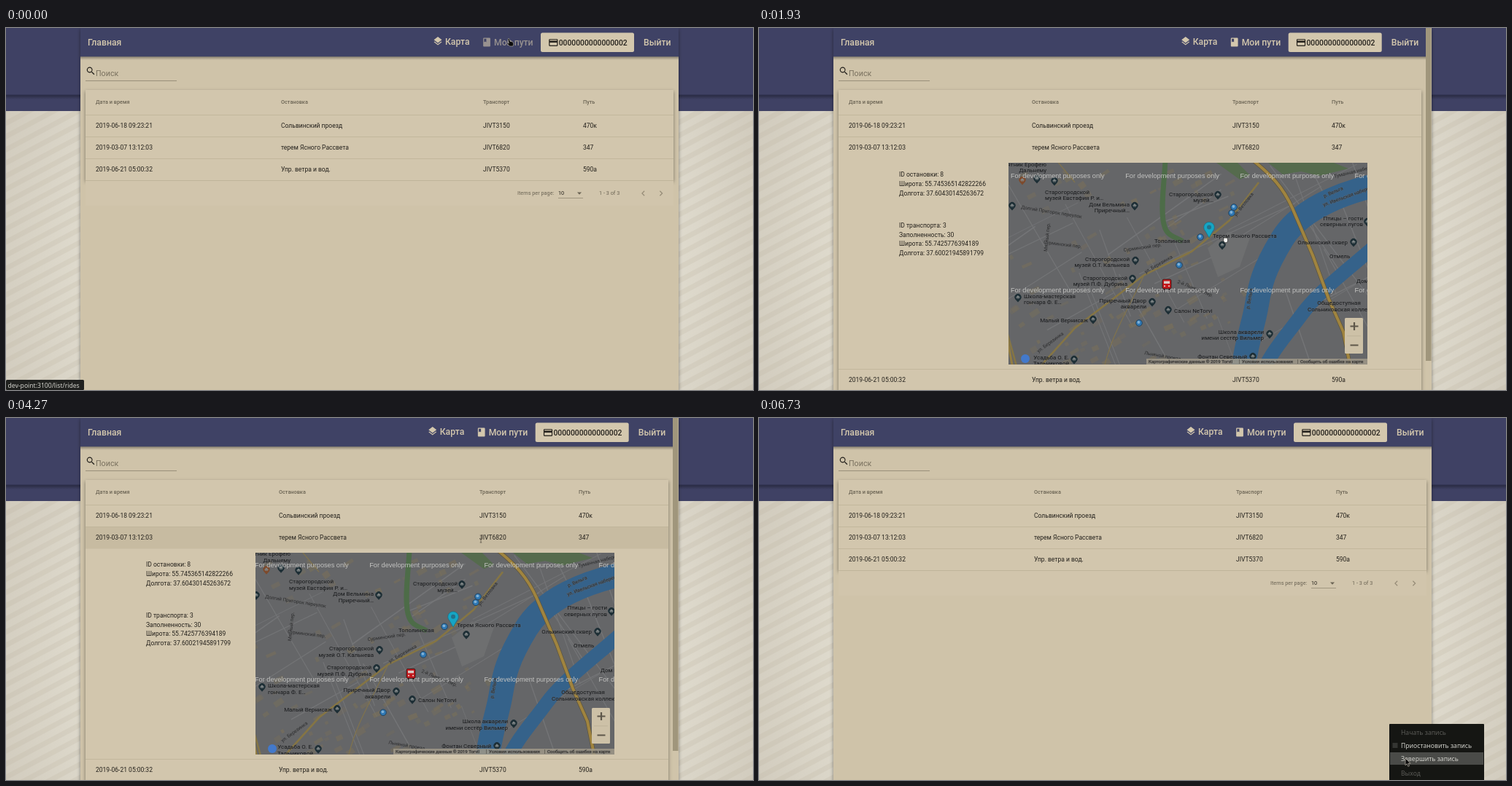
Recreate the animation shown at these times as an HTML page. Size 1024 px wide and 497 px high, loop 7270 ms.

```html
<!DOCTYPE html>
<html lang="ru">
<head>
<meta charset="utf-8">
<title>Поездки</title>
<style>
html, body { margin: 0; width: 100%; height: 100%; overflow: hidden; background: #d0c4aa; }
svg { display: block; width: 100%; height: 100%; }
text { font-family: Roboto, sans-serif; font-size: 8.53px; fill: #24211c; white-space: pre; }
.nav text { font-size: 12.2px; font-weight: 500; fill: #d3c7ad; }
.nav path { fill: #d3c7ad; }
.nav .card { font-size: 10.35px; fill: #24211c; }
.nav path.dark { fill: #24211c; }
.head text { font-size: 7.3px; font-weight: 500; fill: #6b6454; }
.small text { font-size: 7.3px; fill: #6b6454; }
.map text { font-size: 7.95px; fill: #17191b; stroke: #67686a; stroke-width: 1.2px; stroke-opacity: .5; paint-order: stroke; }
.map .street { font-size: 6.6px; fill: #2a2b2c; }
.map .stamp { font-family: "Liberation Sans", Arial, sans-serif; font-size: 9.2px; fill: #c2c2c0; stroke: none; }
.legal text { font-size: 6.1px; fill: #26241f; }
.os text { font-family: "Noto Sans", sans-serif; font-size: 8.6px; fill: #d2d2cc; }
.os .off { fill: #5b5b57; }
</style>
</head>
<body>
<svg id="stage" viewBox="0 0 1024 497" preserveAspectRatio="none"></svg>
<script>
const LOOP = 7270, STEP = 200 / 3, FULL = 289;
const stage = document.getElementById('stage');

const rect = (x, y, w, h, fill, extra = '') =>
  `<rect x="${x}" y="${y}" width="${w}" height="${h}" fill="${fill}" ${extra}/>`;
const text = (x, y, s, extra = '') => `<text x="${x}" y="${y}" ${extra}>${s}</text>`;
const line = (d, color, width, extra = '') =>
  `<path d="${d}" fill="none" stroke="${color}" stroke-width="${width}" ${extra}/>`;

const ICONS = {
  layers: 'M12 18.54l-7.37-5.73L3 14.07l9 7 9-7-1.63-1.27zM12 16l7.36-5.73L21 9l-9-7-9 7 1.63 1.27z',
  book: 'M18 2H6c-1.1 0-2 .9-2 2v16c0 1.1.9 2 2 2h12c1.1 0 2-.9 2-2V4c0-1.1-.9-2-2-2zM6 4h5v8l-2.5-1.5L6 12z',
  card: 'M20 4H4c-1.1 0-2 .9-2 2v12c0 1.1.9 2 2 2h16c1.1 0 2-.9 2-2V6c0-1.1-.9-2-2-2zm0 14H4v-6h16zm0-10H4V6h16z',
  search: 'M15.5 14h-.8l-.3-.3A6.5 6.5 0 1 0 13.7 14.4l.3.3v.8l5 5 1.5-1.5zm-6 0a4.5 4.5 0 1 1 0-9 4.5 4.5 0 0 1 0 9z',
  prev: 'M15.4 7.4L14 6l-6 6 6 6 1.4-1.4L10.8 12z',
  next: 'M10 6L8.6 7.4 13.2 12l-4.6 4.6L10 18l6-6z'
};
const icon = (name, cx, cy, extra = '') =>
  `<path d="${ICONS[name]}" transform="translate(${cx - 7.3} ${cy - 7.3}) scale(.61)" ${extra}/>`;

// Table
const COLUMNS = [123, 377, 654, 791];
const cells = (y, values) =>
  values.map((v, i) => text(COLUMNS[i], y, v, `class="col${i}"`)).join('');
const border = y => rect(109, y, 806, .7, '#bcb096', 'class="wide"');

// Map
let seed = 11;
const random = () => (seed = (seed * 16807) % 2147483647) / 2147483647;
const between = (a, b) => a + random() * (b - a);

function cityBlocks() {
  let out = '';
  for (let i = 0; i < 34; i++) {
    const x = between(340, 880), y = between(180, 470), steep = i % 2;
    const length = between(40, 130), angle = (steep ? 62 : -27) + between(-9, 9);
    out += line(`M${-length} 0H${length}`, '#747577', between(.7, 1.6),
      `transform="translate(${x} ${y}) rotate(${angle})"`);
  }
  for (let i = 0; i < 110; i++) {
    const x = between(350, 680), y = between(190, 462);
    out += rect(0, 0, between(4, 15), between(3, 9), '#7a7059',
      `opacity="${between(.25, .65)}" transform="translate(${x} ${y}) rotate(${between(-36, -22)})"`);
  }
  return out;
}

const PIN = 'M0 6.5L-3.6 2.4A4.6 4.6 0 1 1 3.6 2.4Z';
const pin = (x, y, fill = '#1d2e35') =>
  `<g transform="translate(${x} ${y})"><path d="${PIN}" fill="${fill}"/><path d="M-2 1h4M0-2.5l2.4 2.4h-4.8z" stroke="#83898a" stroke-width=".8" fill="#83898a"/></g>`;

const PLACES = [
  ['end', 411, 188, 'Памятник Ерофею|Дальнему', 398, 205],
  ['start', 409, 226, 'Старогородской|музей Евстафия Р. и…', 422, 208],
  ['end', 525, 243, 'Дом Вельмина|Приречный…', 532, 242],
  ['end', 640, 229, 'Старогородской|музей…', 646, 227],
  ['end', 357, 242, 'Клуб|на', 364, 242],
  ['start', 639, 286, 'Терем Ясного Рассвета', 652, 296],
  ['end', 525, 318, 'Старогородской|музей О.Т. Кальнева', 533, 317],
  ['end', 522, 344, 'Старогородской|музей П.Ф. Дубрина', 529, 342],
  ['start', 380, 369, 'Школа-мастерская|гончара Ф. Е…', 372, 368],
  ['end', 548, 375, 'Приречный Двор|акварели', 556, 374],
  ['start', 586, 389, 'Салон NeTorvi', 578, 385],
  ['end', 468, 402, 'Малый Вернисаж', 475, 398],
  ['end', 709, 418, 'Школа акварели|имени сестёр Вильмер', 717, 418],
  ['end', 686, 452, 'Фонтан Северный', 694, 449],
  ['end', 442, 453, 'Усадьба О. Е.|Тальниковой', 449, 453],
  ['end', 845, 262, 'Птицы – гости|северных лугов', 851, 264],
  ['end', 824, 295, 'Ольхинский сквер', 832, 292]
];
const places = () => PLACES.map(([anchor, x, y, name, px, py]) =>
  name.split('|').map((s, i) => text(x, y + i * 8.4, s, `text-anchor="${anchor}"`)).join('') + pin(px, py)).join('');

const STREETS = [
  [547, 335, -30, 'ул. Березинка'], [400, 444, -36, 'ул. Березинка'], [671, 257, -52, 'ул. Ветловка'],
  [792, 231, -24, 'р. Вельга'], [689, 384, -80, 'р. Вельга'], [806, 204, -14, 'Туманная набережная'],
  [791, 243, -20, 'ул. Ивельская набережная'], [407, 294, 7, 'Сурминский пер.'], [517, 305, -8, 'Сурминский пер.'],
  [376, 246, 9, 'Долгий Пригорок переулок'], [412, 305, -84, 'Мятный пер.'], [352, 392, -84, 'Речной б-р'],
  [590, 348, 22, '2-й Льняной пер.'], [545, 446, 10, 'Льняной проезд']
];
const streets = () => STREETS.map(([x, y, a, s]) =>
  text(0, 0, s, `class="street" transform="translate(${x} ${y}) rotate(${a})"`)).join('');

const dot = (x, y) =>
  `<circle cx="${x}" cy="${y}" r="4.3" fill="#2f78b4" stroke="#24435d"/><circle cx="${x - .6}" cy="${y - 1}" r="1.9" fill="#7fb1d6"/>`;

function stamps() {
  let out = '';
  for (let i = -1; i < 4; i++)
    for (let j = 0; j < 2; j++)
      out += text(362 + i * 157.2, 203.6 + j * 157, 'For development purposes only', 'class="stamp"');
  return out;
}

const map = () => `
  ${rect(342, 185, 492, 277, '#77776f')}
  <g id="tiles">
    ${rect(347, 170, 560, 310, '#656668')}
    ${cityBlocks()}
    <path d="M632 300l28-22 30 8-14 40-30 14z" fill="#6e6f70"/>
    ${line('M574 180C572 215 568 240 571 262S584 283 598 291', '#4d6c48', 7)}
    <path d="M715 183h90l20 8-40 10-25-6-25 4zM640 180l30 0 20 20-14 6z" fill="#556b4d"/>
    ${line('M880 210C820 222 760 245 734 288S704 350 699 380 684 430 679 480', '#35628a', 33)}
    ${line('M880 280C845 315 790 352 762 390S720 440 700 485', '#35628a', 19)}
    ${line('M347 360C350 400 362 430 372 470M396 470L450 410 545 337 610 305 662 262 702 210', '#857544', 2.6)}
    ${line('M347 340C352 400 358 430 366 470', '#927c42', 3)}
    ${line('M692 178C720 200 736 218 748 245L776 310 798 370 818 415 830 475', '#5d553f', 5.5)}
    ${line('M692 178C720 200 736 218 748 245L776 310 798 370 818 415 830 475', '#a0843f', 4)}
    ${line('M490 465C500 420 520 390 545 337M425 180L450 210', '#80734c', 1.2)}
    ${streets()}${places()}
    ${pin(378, 207, '#7d4a2c')}
    ${text(559, 293, 'Тополинская')}${text(799, 314, 'Отмель')}
    ${text(812, 378, 'Общедоступная', 'text-anchor="middle"')}${text(819, 386.5, 'Сольниковская коллекция', 'text-anchor="middle"')}
    ${text(836, 348, 'Дом Ветров')}
    ${stamps()}
    ${dot(538, 403)}${dot(593, 323.5)}${dot(622, 285)}${dot(665, 252)}${dot(668, 244)}
    <path d="M634 286L629 277A7.3 7.3 0 1 1 639 277Z" fill="#16a5c4" stroke="#1a6a80" stroke-width=".7"/>
    <circle cx="634" cy="271.5" r="3" fill="#23718a"/>
    ${rect(570, 343, 12, 13, '#c4181c', 'rx="2" stroke="#2b1010" stroke-width=".8"')}
    ${rect(572, 345.5, 8, 3.5, '#d8c9c4')}${rect(572, 351.5, 2, 1.6, '#e6d5cc')}${rect(578, 351.5, 2, 1.6, '#e6d5cc')}
    ${rect(571.5, 356, 2, 1.6, '#2b1010')}${rect(578.5, 356, 2, 1.6, '#2b1010')}
  </g>
  <circle cx="365" cy="454" r="6" fill="#4379cb"/>
  <g class="legal">${rect(531, 454, 303, 8, '#9f9889', 'opacity=".85"')}
    ${text(534, 460.3, 'Картографические данные © 2019 Torvil')}
    ${text(662, 460.3, 'Условия использования')}${text(742, 460.3, 'Сообщить об ошибке на карте')}
    ${line('M658.5 455v6M738.5 455v6', '#4b4840', .6)}
  </g>
  ${rect(803, 398, 25, 49, '#cdc1a7', 'rx="1.5"')}
  ${line('M806 422.8h19', '#b3a88f', .6)}
  ${line('M810.5 409.5h11M816 404v11M810.5 435.5h11', '#5e574a', 2.2)}`;

const details = ['ID остановки: 8', 'Широта: 55.745365142822266', 'Долгота: 37.60430145263672', '',
  'ID транспорта: 3', 'Заполненность: 30', 'Широта: 55.7425776394189', 'Долгота: 37.60021945891799']
  .map((s, i) => text(192, i < 4 ? 203.7 + i * 13 : 273.6 + (i - 4) * 12.9, s)).join('');

stage.innerHTML = `
<defs>
  <radialGradient id="paper" gradientUnits="userSpaceOnUse" cx="512" cy="320" r="560">
    <stop offset=".65" stop-color="#e3dfd2"/><stop offset="1" stop-color="#d0cabc"/>
  </radialGradient>
  <pattern id="stripes" width="16" height="16" patternUnits="userSpaceOnUse" patternTransform="rotate(-28)">
    ${rect(0, 0, 16, 7, '#b9b09c', 'opacity=".2"')}
  </pattern>
  <linearGradient id="fade" x2="0" y2="1"><stop stop-opacity=".35"/><stop offset="1" stop-opacity="0"/></linearGradient>
  <filter id="lift" x="-5%" y="-10%" width="110%" height="125%"><feDropShadow dx="0" dy="2" stdDeviation="2.6" flood-opacity=".42"/></filter>
  <clipPath id="rowClip"><rect id="reveal" x="109" y="179.5" width="806" height="0"/></clipPath>
  <clipPath id="mapClip">${rect(342, 185, 492, 277, '#000')}</clipPath>
</defs>
${rect(0, 0, 1024, 497, 'url(#paper)')}${rect(0, 114, 1024, 383, 'url(#stripes)')}
${rect(0, 0, 1024, 114, '#3f4164')}${rect(0, 92, 1024, 6, 'url(#fade)')}${rect(0, 91.5, 1024, 1, '#2f314d')}
${rect(102, 0, 820, 510, '#cfc3a9', 'filter="url(#lift)"')}
<rect id="table" class="wide" x="109" y="85" width="806" height="124.5" fill="#d2c6ad" filter="url(#lift)"/>
<g class="below small">
  ${rect(109, 209.5, 806, 34.5, '#d1c5ac', 'class="wide"')}
  ${text(701, 229.3, 'Items per page:')}${text(757, 229.3, '10', 'style="fill:#24211c"')}
  ${rect(757, 233, 34, .7, '#8d836e')}<path d="M783 225.5h6l-3 3.2z" fill="#6b6454"/>
  ${text(813, 229.3, '1 - 3 of 3')}
  ${icon('prev', 873.5, 227, 'fill="#958b76"')}${icon('next', 898, 227, 'fill="#958b76"')}
</g>
${rect(109, 149.5, 806, 30, '#c7bba1', 'id="rowTint" class="wide"')}
${rect(109, 119.8, 806, 29.7, '#c7bba1', 'id="firstTint" class="wide"')}
<g class="head">${cells(104.3, ['Дата и время', 'Остановка', 'Транспорт', 'Путь'])}</g>
${cells(137, ['2019-06-18 09:23:21', 'Сольвинский проезд', 'JIVT3150', '470к'])}
${cells(167.3, ['2019-03-07 13:12:03', 'терем Ясного Рассвета', 'JIVT6820', '347'])}
${border(119.2)}${border(149.2)}
<g clip-path="url(#rowClip)">
  ${details}
  <g id="mapBox"><g class="map" clip-path="url(#mapClip)">${map()}</g></g>
</g>
<g class="below">
  ${border(179.2)}${cells(197.4, ['2019-06-21 05:00:32', 'Упр. ветра и вод.', 'JIVT5370', '590а'])}${border(209.2)}
</g>
${icon('search', 116.2, 59, 'fill="#24211c"')}
${text(123, 66.3, 'Поиск', 'style="font-size:10.7px;fill:#7a715f"')}${rect(109, 72, 125, .8, '#8d836e')}
${rect(102, 39, 820, 5, 'url(#fade)')}${rect(102, 0, 820, 39.3, '#3f4265')}
<g class="nav">${text(112, 23.6, 'Главная')}
  <g id="links">
    ${icon('layers', 592, 18)}${text(602, 22.6, 'Карта')}
    <g id="trips">${icon('book', 659, 19.5)}${text(669, 23.8, 'Мои пути')}</g>
    ${rect(733, 6.5, 128, 26.5, '#d3c7ad', 'rx="2.5"')}
    ${icon('card', 750.3, 20, 'class="dark"')}${text(757.7, 23.7, '0000000000000002', 'class="card"')}
    ${text(874, 23.8, 'Выйти')}
  </g>
</g>
<g id="scrollbar">${rect(914, 0, 8, 497, '#d0c4aa')}${rect(914, 0, 7.5, 457, '#a0967c')}</g>
<g class="os">
  <g id="status">${rect(0, 483, 107, 14, '#20211f', 'rx="1.5"')}${text(2.5, 493.8, 'dev-point:3100/list/rides')}</g>
  <g id="menu">
    ${rect(864, 420, 130, 80, '#151613', 'rx="1"')}${rect(865, 459, 128, 17, '#4a4b48', 'id="pick"')}
    ${rect(868.5, 446, 7, 7, '#343532')}
    ${text(880, 435, 'Начать запись', 'class="off"')}${text(880, 453, 'Приостановить запись')}
    ${text(880, 470.5, 'Завершить запись')}${text(880, 491, 'Выход', 'class="off"')}
  </g>
</g>
<g id="cursor">
  <path id="arrow" d="M0 0V9.8L2.2 7.8 3.8 11.4 5.5 10.6 3.9 7.2H7Z" fill="#0c0c0c" stroke="#d8d2c4" stroke-width=".6"/>
  <path id="hand" d="M0 1Q1-.6 2 1L3 4.2 7 5.2Q8.5 8 7 11H2.5L-1 7.5Q-.5 6 1.3 7Z" fill="#0c0c0c" stroke="#d8d2c4" stroke-width=".5"/>
  <path id="grab" d="M-2.5-2.8Q-1-4 0-3 1.6-4 2.8-2.4 4 1 2 3.4H-1L-3 .8Z" fill="#f2f2f0" stroke="#222" stroke-width=".7"/>
  <path id="beam" d="M-1.3-5H1.3M0-5V5M-1.3 5H1.3" fill="none" stroke="#5b5548" stroke-width=".8"/>
</g>`;

const $ = id => document.getElementById(id);
const all = selector => [...stage.querySelectorAll(selector)];
const wide = all('.wide'), below = all('.below');
const columns = COLUMNS.map((_, i) => all('.col' + i));
const COLUMN_SHIFT = [0, -3, -5, -6];

const CURSOR = [[0, 688, 14], [70, 688, 14], [330, 650, 92], [730, 578, 160], [1333, 575, 166], [1733, 575, 166],
  [2000, 661, 333], [2270, 661, 333], [2600, 678, 331], [2870, 651, 328], [3000, 665, 324], [3133, 662, 315],
  [3733, 651, 166], [4267, 651, 166], [4600, 656, 174], [4800, 670, 193], [4933, 850, 368], [5400, 874, 484],
  [6000, 874, 484], [6333, 884, 452], [6667, 888, 462], [6733, 886, 467]];
const DRAG = [[2270, -17, 2], [2600, 0, 0], [2930, -28, 1], [3000, -28, 1.2], [3200, -21, 1.3]];

function follow(keys, t) {
  const i = keys.findIndex(k => k[0] > t);
  if (i < 0) return keys[keys.length - 1].slice(1);
  if (i === 0) return keys[0].slice(1);
  const [a, b] = [keys[i - 1], keys[i]], p = (t - a[0]) / (b[0] - a[0]);
  return [1, 2].map(n => a[n] + (b[n] - a[n]) * p);
}

// cubic-bezier(.4, 0, .2, 1), solved by bisection
function ease(x) {
  if (x <= 0) return 0;
  if (x >= 1) return 1;
  let lo = 0, hi = 1;
  for (let i = 0; i < 24; i++) {
    const s = (lo + hi) / 2, r = 1 - s;
    if (1.2 * r * r * s + .6 * r * s * s + s * s * s < x) lo = s; else hi = s;
  }
  return lo * lo * (3 - 2 * lo);
}

const show = (id, on) => $(id).setAttribute('visibility', on ? 'visible' : 'hidden');
const move = (el, x, y) => el.setAttribute('transform', `translate(${x} ${y})`);
const within = (t, a, b) => t >= a && t < b;

function render(time) {
  const t = Math.floor((time + 4) / STEP) * STEP;
  const shift = FULL * (ease((t - 1302) / 225) - ease((t - 4335) / 225));
  const narrow = shift > 250;

  wide.forEach(el => el.setAttribute('width', narrow ? 799 : 806));
  columns.forEach((list, i) => list.forEach(el => move(el, narrow ? COLUMN_SHIFT[i] : 0, 0)));
  below.forEach(el => move(el, 0, shift));
  $('table').setAttribute('height', 124.5 + shift);
  $('reveal').setAttribute('height', shift);
  move($('links'), narrow ? -7.3 : 0, 0);
  move($('mapBox'), narrow ? 0 : 4, 0);
  move($('tiles'), ...follow(DRAG, t));
  show('scrollbar', narrow);

  const [x, y] = follow(CURSOR, t);
  const pressed = within(t, 1190, 1530) || within(t, 4320, 4860);
  const onRow = within(y, 149.5, 179.5) && t < 4700;
  show('rowTint', pressed || onRow);
  $('rowTint').setAttribute('fill', pressed ? '#a99f87' : '#c7bba1');
  show('firstTint', within(y, 119.5, 149.5) && t < 1000);
  $('trips').setAttribute('opacity', t < 130 ? .6 : 1);
  show('status', t < 190);

  show('menu', t > 5990);
  const row = y < 459 ? 441 : 459;
  $('pick').setAttribute('y', row);
  show('pick', t > 5990 && y < 476);

  move($('cursor'), x, y);
  const kind = t < 130 ? 'hand'
    : within(t, 1930, 3600) && within(y, 185, 462) ? 'grab'
    : within(t, 3600, 4290) ? 'beam' : 'arrow';
  ['arrow', 'hand', 'grab', 'beam'].forEach(id => show(id, id === kind));
}

const start = performance.now();
function tick() {
  render((performance.now() - start) % LOOP);
  requestAnimationFrame(tick);
}
tick();
</script>
</body>
</html>
```
